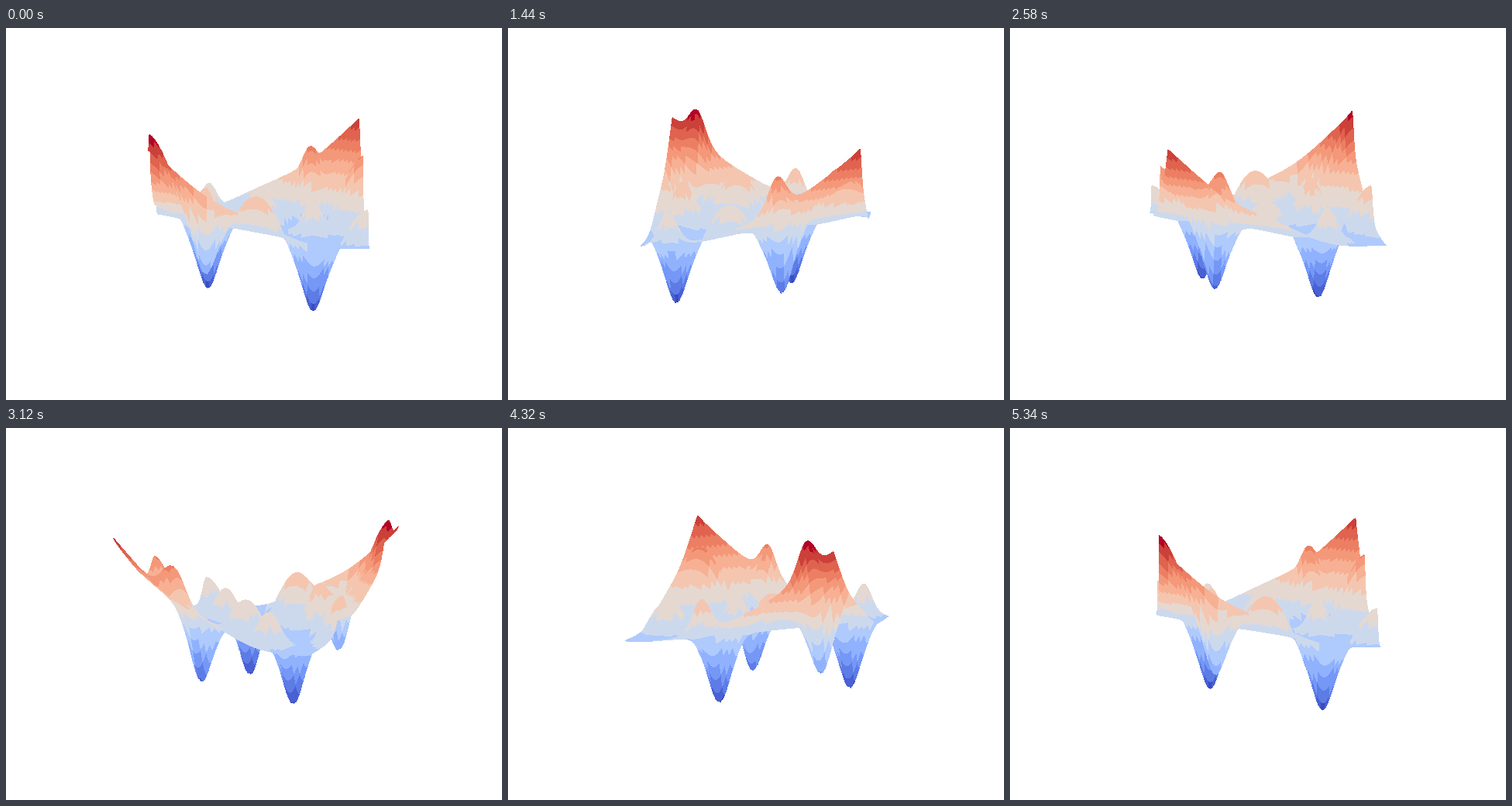
A matplotlib script for the animation above (5.4 s loop, 640x480 px).

```python
import numpy as np
import matplotlib.pyplot as plt
from matplotlib.animation import FuncAnimation
from matplotlib.collections import PolyCollection

W, H, DPI = 640, 480, 100
FRAMES, INTERVAL = 90, 60

# Camera: square viewport of side H, seen from a distance with perspective
ELEV = np.radians(10)
DIST = 10
SCALE = H / 0.185
CX = (W - H) / 2 + H * 0.95 / 1.85
CY = H * 0.95 / 1.85
HALF_XY = 4 / 7 / 1.1
HALF_Z = 3 / 7

# Tones of the colour map, as a stepped scale
TONES = np.array([0.0, 0.05, 0.11, 0.18, 0.26, 0.35, 0.4375, 0.535,
                  0.62, 0.69, 0.75, 0.81, 0.87, 0.93, 1.0])


def bird(x, y):
    """Bird test function."""
    return (np.sin(x) * np.exp((1 - np.cos(y)) ** 2)
            + np.cos(y) * np.exp((1 - np.sin(x)) ** 2)
            + (x - y) ** 2)


def build_patches(cells=50):
    """Square patches with eight outline points each, shape (n, 8)."""
    t = np.linspace(-2 * np.pi, 2 * np.pi, 2 * cells + 1)
    x, y = np.meshgrid(t, t)
    z = bird(x, y)
    row, col = np.mgrid[0:2 * cells:2, 0:2 * cells:2]
    rows = row.reshape(-1, 1) + np.array([0, 0, 0, 1, 2, 2, 2, 1])
    cols = col.reshape(-1, 1) + np.array([0, 1, 2, 2, 2, 1, 0, 0])
    mid, half = (z.max() + z.min()) / 2, np.ptp(z) / 2
    unit = HALF_XY / (2 * np.pi)
    return (x[rows, cols] * unit, y[rows, cols] * unit,
            (z[rows, cols] - mid) / half * HALF_Z)


def patch_colors(z):
    level = z.mean(axis=1)
    level = (level - level.min()) / np.ptp(level)
    step = np.abs(level[:, None] - TONES).argmin(axis=1)
    return plt.get_cmap("coolwarm")(TONES)[step]


def project(azim):
    """Screen outlines of all patches and their nearness to the viewer."""
    ca, sa = np.cos(azim), np.sin(azim)
    ce, se = np.cos(ELEV), np.sin(ELEV)
    side = Y * ca - X * sa
    toward = X * ca + Y * sa
    near = toward * ce + Z * se
    up = Z * ce - toward * se
    k = SCALE / (DIST - near)
    outlines = np.stack([CX + side * k, CY + up * k], axis=-1)
    return outlines, k.mean(axis=1)


X, Y, Z = build_patches()
COLORS = patch_colors(Z)

fig = plt.figure(figsize=(W / DPI, H / DPI), dpi=DPI, facecolor="white")
ax = fig.add_axes([0, 0, 1, 1])
ax.set_xlim(0, W)
ax.set_ylim(0, H)
ax.axis("off")
surface = PolyCollection([], linewidths=0, edgecolors="none",
                         antialiaseds=False)
ax.add_collection(surface, autolim=False)


def update(i):
    outlines, near = project(2 * np.pi * i / FRAMES)
    order = np.argsort(near)
    surface.set_verts(outlines[order])
    surface.set_facecolor(COLORS[order])
    return [surface]


anim = FuncAnimation(fig, update, frames=FRAMES, interval=INTERVAL,
                     repeat=True, repeat_delay=0)
plt.show()
```
